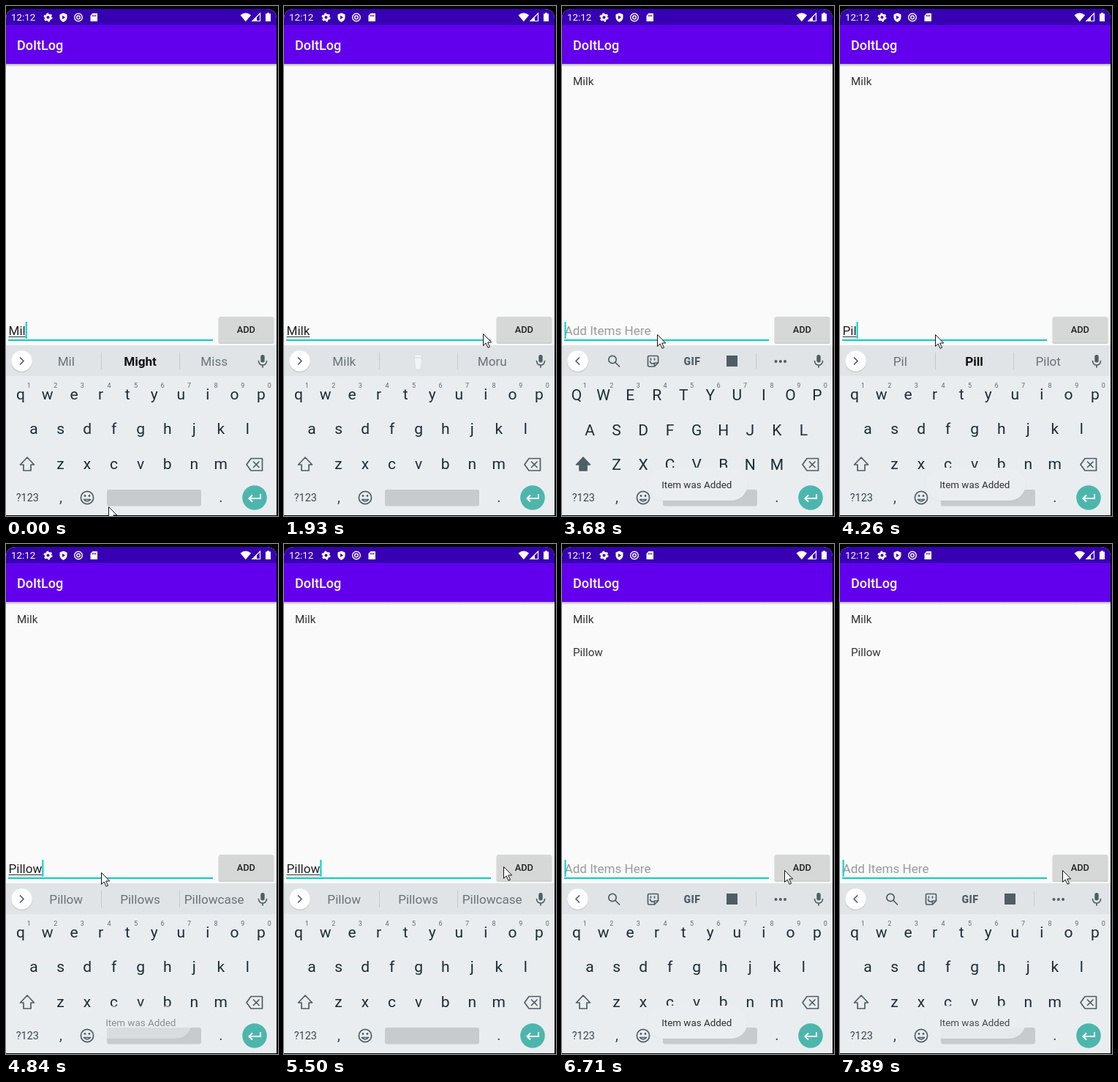
Animation of 372x696 px, one loop 8000 ms. Source, as an HTML page:

```html
<!DOCTYPE html>
<html lang="en">
<head>
<meta charset="utf-8">
<title>To-do list</title>
<style>
html, body { margin: 0; width: 100%; height: 100%; overflow: hidden; background: #000; }
svg { display: block; width: 372px; height: 696px; font-family: Roboto, sans-serif; }
text { white-space: pre; }
.mid { text-anchor: middle; }
.medium { font-weight: 500; }
.line { fill: none; stroke: #4f5d64; stroke-width: 1.7; stroke-linejoin: round; stroke-linecap: round; }
.solid { fill: #4f5d64; }
</style>
</head>
<body>
<svg viewBox="0 0 372 696">
  <defs>
    <linearGradient id="shade" x2="0" y2="1">
      <stop stop-color="#000" stop-opacity=".28"/><stop offset="1" stop-color="#000" stop-opacity="0"/>
    </linearGradient>
    <clipPath id="screen"><path d="M0 695V18Q0 4 14 4H356Q370 4 370 18V695Z"/></clipPath>
  </defs>
  <g clip-path="url(#screen)">
    <rect width="370" height="696" fill="#fafafa"/>
    <rect width="370" height="27" fill="#3700b3"/>
    <rect y="26" width="370" height="53" fill="#6200ee"/>
    <rect y="79" width="370" height="4" fill="url(#shade)"/>

    <!-- Status bar -->
    <g fill="#fff">
      <text x="7" y="20" font-size="13.4">12:12</text>
      <circle cx="57.500" cy="15.500" r="3.400" fill="none" stroke="#fff" stroke-width="2.800"/>
      <circle cx="57.500" cy="15.500" r="5.100" fill="none" stroke="#fff" stroke-width="2" stroke-dasharray="2.670"/>
      <path d="M78.500 9.500l5 2v4q0 4-5 6.500q-5-2.500-5-6.500v-4z"/>
      <path d="M77 13l4 2.500l-4 2.500z" fill="#3700b3"/>
      <circle cx="99" cy="15.500" r="5.300" fill="none" stroke="#fff" stroke-width="1.400"/>
      <circle cx="99" cy="15.500" r="2.300" fill="none" stroke="#fff" stroke-width="1.400"/>
      <path d="M118.500 10h6.500v11h-9.500v-8z"/>
      <path d="M118.700 12v2.500m2-2.500v2.500m2-2.500v2.500" stroke="#3700b3"/>
      <path d="M320.500 12.500q7.300-6 14.600 0l-7.300 8.800z"/>
      <path d="M347.500 10v10.500h-10.500z" fill="none" stroke="#fff" stroke-width="1.200"/>
      <path d="M343 14.500v6h-6z"/>
      <path d="M357 10.500v-1.200h3v1.200h2v10.500h-7v-10.500z"/>
    </g>
    <text class="medium" x="15" y="60" font-size="18" fill="#fff">DoItLog</text>

    <text id="milk" x="15" y="108" font-size="15.2" fill="#333">Milk</text>
    <text id="pillow" x="15" y="153" font-size="15.2" fill="#333">Pillow</text>

    <!-- Entry row -->
    <text id="entry" x="3.500" y="449" font-size="17.1"></text>
    <rect id="underline" x="3.500" y="451" height="1" fill="#333"/>
    <rect x="3" y="455" width="280" height="2" fill="#03d0c5"/>
    <rect id="caret" y="431" width="2" height="23" fill="#03d0c5"/>
    <rect x="290.500" y="425" width="76" height="36" rx="2" fill="#000" opacity=".18"/>
    <rect x="291" y="424" width="75" height="35.500" rx="2" fill="#d6d7d7"/>
    <rect id="press" x="291" y="424" width="75" height="35.500" rx="2"/>
    <text class="mid medium" x="328.300" y="446" font-size="12.8" fill="#222">ADD</text>

    <!-- Keyboard -->
    <rect y="463" width="370" height="233" fill="#e9edf0"/>
    <rect y="463" width="370" height="42" fill="#e0e4e7"/>
    <circle cx="21.500" cy="485.500" r="14.500" fill="#000" opacity=".12"/>
    <circle cx="21.500" cy="484.500" r="14.200" fill="#fff"/>
    <path id="chevron" class="line"/>
    <g id="suggestions">
      <path d="M130.500 473v23M237.500 473v23" stroke="#c5cacd"/>
      <g id="words"></g>
      <g id="glass">
        <path d="M178 476h11l-1.500 20h-8z" fill="#f3f4f3" stroke="#d2d5d6" stroke-width=".7"/>
        <path d="M178.300 480h10.400" stroke="#cfd2d3"/>
      </g>
    </g>
    <g id="tools">
      <circle class="line" cx="69" cy="482.500" r="5.200"/>
      <path class="line" d="M73 486.500l5.500 5.500" stroke-width="2.200"/>
      <path class="line" d="M119 477.500h11q1.500 0 1.500 1.500v8l-5 5h-7.500q-1.500 0-1.500-1.500v-11.500q0-1.500 1.500-1.500zM131 487h-4.500v4.500M120.500 485q1 4 5 3"/>
      <path d="M121.500 481v2m5-2v2" class="line"/>
      <text class="mid solid" x="178" y="490" font-size="14" font-weight="900" letter-spacing=".6">GIF</text>
      <rect class="solid" x="225" y="477" width="15" height="15"/>
      <path d="M265.500 474v21" stroke="#c5cacd"/>
      <circle class="solid" cx="292.500" cy="485" r="2"/><circle class="solid" cx="298.800" cy="485" r="2"/><circle class="solid" cx="305" cy="485" r="2"/>
    </g>
    <rect class="solid" x="348.300" y="476" width="5.400" height="10.500" rx="2.700"/>
    <path class="line" d="M345.500 484.500q.5 5.500 5.500 5.500t5.500-5.500M351 490v3"/>
    <g id="keys"></g>
    <path id="shift" class="line" d="M29 616l9.500 10h-4.500v8h-10v-8h-4.500z"/>
    <path class="line" d="M335 617.500h15.500v16.500h-15.500l-6-8.250zM338.500 622l7.500 7.500m0-7.500l-7.500 7.500"/>
    <g fill="#37474f">
      <text class="mid" x="29.300" y="676" font-size="14.4">?123</text>
      <text class="mid" x="75" y="677" font-size="20">,</text>
      <text class="mid" x="294" y="677" font-size="20">.</text>
    </g>
    <circle class="line" cx="111" cy="671" r="8.600"/>
    <path class="line" d="M106.500 673.500q4.500 5 9 0z"/>
    <circle class="solid" cx="108" cy="668.500" r="1.400"/><circle class="solid" cx="114" cy="668.500" r="1.400"/>
    <rect x="138" y="660" width="129" height="22.500" rx="3" fill="#c7cbce"/>
    <circle cx="340" cy="671" r="16.800" fill="#4db6ac"/>
    <path d="M348 666v6h-15.500m4.500-4.500l-4.500 4.500l4.500 4.500" fill="none" stroke="#fff" stroke-width="2"/>

    <g id="toast">
      <rect x="115.500" y="630" width="139" height="46" rx="23" fill="#000" opacity=".035"/>
      <rect x="116" y="630" width="138" height="45" rx="22.500" fill="#ebeef0"/>
      <text class="mid" x="184.300" y="658" font-size="13.4" fill="#303030">Item was Added</text>
    </g>
  </g>
  <path id="mouse" d="M.500.500v16l3.700-3.500l2.800 6.300l2.500-1.100l-2.800-6.200h5z" fill="#fff" stroke="#111"/>
</svg>
<script>
const LOOP = 8000;
const $ = id => document.getElementById(id);

const REFRESH = [0, 310, 870, 1280, 1680, 1800, 1930, 2070, 2210, 2350,
  2620, 2760, 2890, 3010, 3150, 3280, 3550, 3680, 3830, 3980, 4130, 4280, 4420, 4560,
  4710, 4840, 4960, 5100, 5230, 5360, 5500, 5760, 5900, 6050, 6170, 6300, 6440,
  6710, 7180, 7770, 7890];

const CARET_ON = [[0, 310], [870, 1680], [2210, 3150], [3550, 5100], [5500, 6300], [6710, 7180], [7770, LOOP]];

const POINTER = [[0, 140, 683], [1530, 140, 683], [1680, 150, 668], [1930, 272, 447], [2210, 319, 425],
  [2350, 318, 436], [2620, 318, 436], [2890, 134, 444], [3010, 130, 448], [4840, 130, 448],
  [5500, 300, 440], [5900, 300, 440], [6050, 282, 445], [6300, 304, 445]];

// Start, typed text, suggestions (null shows the toolbar), bold middle word.
const TYPING = [
  [0, "Mil", ["Mil", "Might", "Miss"], true],
  [1280, "Milk", ["Milk", "", "Moru"]],
  [2620, "", ["Milk", "", "Moru"]],
  [3010, "", null],
  [3830, "P", ["P", "Please", "Put"]],
  [3980, "Pi", ["Pi", "Pick", "Pic"]],
  [4130, "Pil", ["Pil", "Pill", "Pilot"], true],
  [4280, "Pill", ["Pill", "Pills", "Pillow"]],
  [4420, "Pillo", ["Pillo", "Pillow", "Pillows"], true],
  [4560, "Pillow", ["Pillow", "Pillows", "Pillowcase"]],
  [5760, "", ["Pillow", "Pillows", "Pillowcase"]],
  [6170, "", null]
];

const ramp = (t, from, to) => Math.min(1, Math.max(0, (t - from) / (to - from)));
const show = (id, opacity) => $(id).setAttribute("opacity", +opacity);

function addText(parent, content, x, y, size, fill) {
  const el = document.createElementNS("http://www.w3.org/2000/svg", "text");
  const attrs = { x, y, "font-size": size, fill, class: "mid" };
  for (const name in attrs) el.setAttribute(name, attrs[name]);
  el.textContent = content;
  parent.append(el);
  return el;
}

const letters = [];
[["qwertyuiop", 20, 536.5], ["asdfghjkl", 38, 584], ["zxcvbnm", 74.5, 631.5]].forEach(([row, left, y]) =>
  [...row].forEach((letter, i) => {
    const x = left + 36.55 * i;
    letters.push({ letter, y, el: addText($("keys"), letter, x, y, 21, "#1b2d36") });
    if (row.length === 10) addText($("keys"), (i + 1) % 10, x + 11.3, 521, 9, "#5c6b73");
  }));
const words = [82.3, 183.5, 284.7].map(x => addText($("words"), "", x, 491, 17.1, "#697379"));

function pointerAt(t) {
  const next = POINTER.findIndex(p => p[0] > t);
  if (next < 0) return POINTER.at(-1).slice(1);
  const a = POINTER[next - 1], b = POINTER[next], k = ramp(t, a[0], b[0]);
  return [1, 2].map(i => a[i] + (b[i] - a[i]) * k);
}

function draw(time) {
  const t = REFRESH.findLast(moment => moment <= time);
  const [, typed, picks, bold] = TYPING.findLast(step => step[0] <= t);

  $("entry").textContent = typed || "Add Items Here";
  $("entry").setAttribute("fill", typed ? "#222" : "#9a9a9a");
  const width = typed ? $("entry").getComputedTextLength() : 0;
  $("underline").setAttribute("width", width);
  $("caret").setAttribute("x", 3.5 + width);
  show("caret", CARET_ON.some(([from, to]) => t >= from && t < to));

  show("suggestions", !!picks);
  show("tools", !picks);
  $("chevron").setAttribute("d", picks ? "M19.500 480l4.500 4.500l-4.500 4.500" : "M23.500 480l-4.500 4.500l4.500 4.500");
  if (picks) {
    words.forEach((el, i) => el.textContent = picks[i]);
    words[1].setAttribute("font-weight", bold ? 700 : 400);
    words[1].setAttribute("fill", bold ? "#111" : "#697379");
    show("glass", !picks[1]);
  }

  const caps = t >= 3680 && t < 3830;
  for (const { letter, y, el } of letters) {
    el.textContent = caps ? letter.toUpperCase() : letter;
    el.setAttribute("y", caps ? y + 1.8 : y);
  }
  $("shift").style.fill = caps ? "#4f5d64" : "none";

  show("milk", ramp(t, 2620, 3010) ** 1.1);
  show("pillow", ramp(t, 5860, 6280));
  const click = t < 5760 ? 2620 : 5760;
  show("press", t < click ? 0 : .12 * (1 - ramp(t, click, click + 450)));
  show("toast", t < 5760
    ? ramp(t, 2760, 3160) * (1 - ramp(t, 4600, 5080))
    : ramp(t, 5910, 6310) * (1 - ramp(t, 7830, 8310)));

  $("mouse").setAttribute("transform", `translate(${pointerAt(t).map(Math.round)})`);
}

function tick() {
  draw(performance.now() % LOOP);
  requestAnimationFrame(tick);
}
tick();
</script>
</body>
</html>
```
